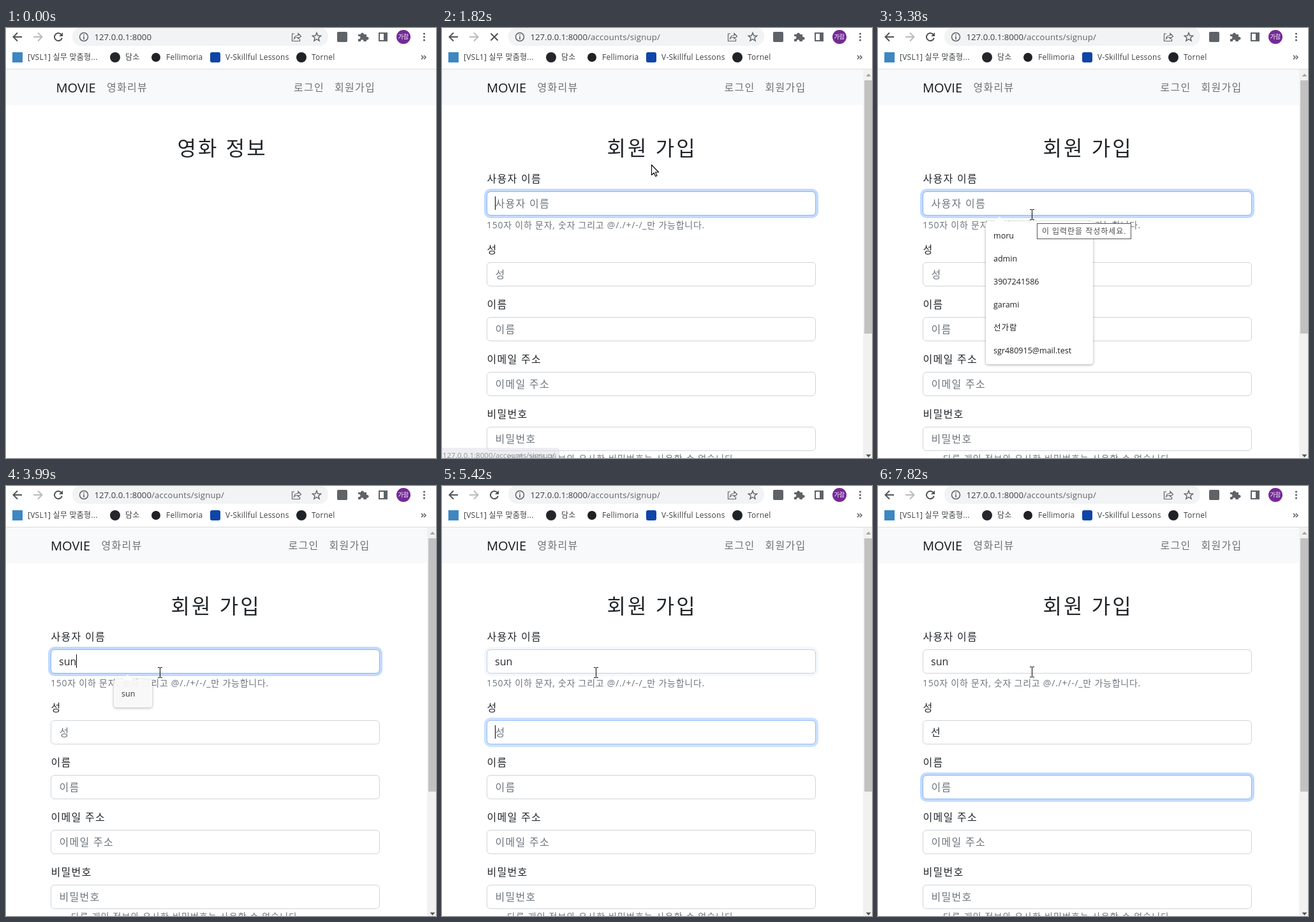
These frames come from a looping animation (674x674 px, 8000 ms). An HTML page with a canvas:

```html
<!DOCTYPE html>
<html lang="ko">
<head>
<meta charset="utf-8">
<title>회원 가입</title>
<style>
html, body { margin: 0; width: 100%; height: 100%; overflow: hidden; background: #fff; }
canvas { display: block; width: 674px; height: 674px; }
</style>
</head>
<body>
<canvas id="stage" width="674" height="674"></canvas>
<script>
const c = document.getElementById('stage').getContext('2d');
const LOOP = 8000, PAGE_AT = 1650, URL_AT = 1410;
const FONT = '"Open Sans", "Noto Sans CJK KR", "Noto Sans CJK", sans-serif';
const INK = '#212529', MUTED = '#6c757d', ICON = '#5f6368';

const clamp = v => Math.max(0, Math.min(1, v));
const ramp = (t, from, to) => clamp((t - from) / (to - from));
const within = (t, from, to) => t >= from && t < to;
// Last value whose start time has passed
const pick = (t, steps) => steps.reduce((v, s) => t >= s[0] ? s[1] : v, '');

// Vertically centred text; hangul is lighter and gets a full em of pitch
function text(str, x, cy, size, color = INK, spacing, weight) {
  const hangul = /[가-힣]/.test(str);
  spacing ??= hangul ? 0.08 : 0;
  weight ??= hangul ? 350 : 400;
  c.font = `${weight} ${size}px ${FONT}`;
  c.letterSpacing = `${(spacing * size).toFixed(2)}px`;
  c.fillStyle = color;
  c.fillText(str, x, cy + size * 0.37);
  return c.measureText(str).width;
}
function rect(x, y, w, h, color) {
  c.fillStyle = color;
  c.fillRect(x, y, w, h);
}
function round(x, y, w, h, r, fill) {
  c.beginPath();
  c.roundRect(x, y, w, h, r);
  if (fill) { c.fillStyle = fill; c.fill(); }
}
function disc(x, y, r, color) {
  c.beginPath();
  c.arc(x, y, r, 0, Math.PI * 2);
  c.fillStyle = color;
  c.fill();
}
function line(d, color = ICON, width = 2) {
  c.strokeStyle = color;
  c.lineWidth = width;
  c.stroke(new Path2D(d));
}
function shape(d, fill) {
  c.fillStyle = fill;
  c.fill(new Path2D(d));
}
function faded(alpha, draw) {
  if (alpha <= 0) return;
  c.save();
  c.globalAlpha = alpha;
  draw();
  c.restore();
}

function toolbar(t) {
  rect(0, 0, 674, 64, '#fff');
  line('M25 14H12M18 7.5L11.5 14L18 20.5', '#505458');
  line('M43 14H56M50 7.5L56.5 14L50 20.5', '#b9bbbe');
  if (within(t, 1200, 2150)) {
    line('M76.5 8.5L87.5 19.5M87.5 8.5L76.5 19.5', '#505458');
  } else {
    line('M86.6 10.2A6 6 0 1 0 87.8 15.5', '#505458');
    shape('M89 7V13H83Z', '#505458');
  }

  round(104, -1, 401, 29, 14, '#f1f3f4');
  line('M128.5 14a6.5 6.5 0 1 1 -13 0a6.5 6.5 0 1 1 13 0', ICON, 1.5);
  rect(121.2, 13, 1.6, 5, ICON);
  rect(121.2, 10, 1.6, 1.7, ICON);
  const host = text('127.0.0.1:8000', 138.5, 14, 13.2, '#3c4043');
  if (t >= URL_AT) text('/accounts/signup/', 138.5 + host, 14, 13.2, ICON, 0.016);

  line('M452 9H448.5V20.5H460.5V17M451.5 17C452 13 454.5 11.5 458 11.5V8.5L462.5 13L458 17V14.5C455 14.5 453 15 451.5 17Z', ICON, 1.2);
  const star = [];
  for (let i = 0; i < 10; i++) {
    const a = -Math.PI / 2 + i * Math.PI / 5, r = i % 2 ? 3 : 7;
    star.push(`${487 + r * Math.cos(a)} ${14.5 + r * Math.sin(a)}`);
  }
  line(`M${star.join('L')}Z`, ICON, 1.4);

  round(519, 6, 16, 16, 2, ICON);
  shape('M552 10H556A2.5 2.5 0 1 1 561 10H565V14A2.5 2.5 0 1 1 565 18.5V21H560.5A2.3 2.3 0 1 0 556 21H552V17A2.3 2.3 0 1 0 552 13Z', ICON);
  line('M585 8H597V20H585Z', ICON, 2);
  rect(592, 7, 6, 14, ICON);
  disc(623, 14, 11, '#742a97');
  text('가람', 614.5, 14, 9, '#fff', 0, 400);
  for (const y of [9, 14, 19]) disc(655.5, y, 1.6, ICON);

  rect(10, 38, 16, 16, '#3d87c3');
  disc(171, 46, 8, '#24262a');
  disc(235, 46, 7, '#202124');
  round(320, 38, 16, 16, 3, '#0f45a8');
  disc(463, 46, 8, '#1f2328');
  const marks = [['[VSL1] 실무 맞춤형...', 34], ['담소', 187], ['Fellimoria', 251],
    ['V-Skillful Lessons', 344], ['Tornel', 479]];
  for (const [label, x] of marks) text(label, x, 45.5, 12, '#3c4043', 0.02, 400);
  line('M651 43L654 46L651 49M655 43L658 46L655 49', ICON, 1.6);
  rect(0, 64, 674, 1, '#dadce0');
}

function navbar(dx, hover) {
  rect(0, 65, 674, 56, '#f8f9fa');
  const link = 'rgba(0,0,0,.55)';
  text('MOVIE', 78.5 + dx, 94, 20, 'rgba(0,0,0,.9)');
  text('영화리뷰', 158 + dx, 93, 16, link);
  text('로그인', 451 + dx, 93, 16, link);
  text('회원가입', 515 + dx, 93, 16, hover ? 'rgba(0,0,0,.7)' : link);
}

const heading = (str, x) => text(str, x, 188, 32, INK, 0.095);

function field(y, label, hint, value, ring) {
  text(label, 70.5, y - 20, 16);
  faded(ring * 0.25, () => {
    c.beginPath();
    c.roundRect(66, y - 4, 524, 46, 10);
    c.roundRect(70, y, 516, 38, 6);
    c.fillStyle = '#0d6efd';
    c.fill('evenodd');
  });
  round(70.5, y + 0.5, 515, 37, 5.5, '#fff');
  c.lineWidth = 1;
  c.strokeStyle = '#ced4da';
  c.stroke();
  faded(ring, () => { c.strokeStyle = '#86b7fe'; c.stroke(); });
  if (value) return text(value, 83, y + 19, 16);
  text(hint, 83.5, y + 19, 16, MUTED);
  return 0;
}

const userSteps = [[3580, 's'], [3790, 'su'], [3990, 'sun'], [4750, 'su'], [5160, 'sun']];
const surnameSteps = [[6430, 'ㅅ'], [6560, '서'], [6690, '선']];
const caretOn = [[1820, 2360], [2880, 3380], [3580, 4550], [5090, 5820], [6360, 7820]];
// Start of focus for each field; the last one ends after the loop
const FOCUS = [PAGE_AT, 5290, 7250, 2 * LOOP];

function form(t) {
  heading('회원 가입', 258.5);
  const glow = i => ramp(t, FOCUS[i], FOCUS[i] + 160);
  const ring = i => glow(i) - glow(i + 1);
  const surname = pick(t, surnameSteps);
  const widths = [
    field(256, '사용자 이름', '사용자 이름', pick(t, userSteps), ring(0)),
    field(367, '성', '성', surname, ring(1)),
    field(453, '이름', '이름', '', ring(2))
  ];
  field(539, '이메일 주소', '이메일 주소', '', 0);
  field(625, '비밀번호', '비밀번호', '', 0);
  text('150자 이하 문자, 숫자 그리고 @/./+/-/_만 가능합니다.', 70, 309, 14, MUTED, 0.054, 400);
  text('다른 개인 정보와 유사한 비밀번호는 사용할 수 없습니다.', 102, 675, 14, MUTED);

  if (surname && t < 7150) rect(84, 394, 14, 1, INK);
  if (caretOn.some(([a, b]) => within(t, a, b))) {
    const i = t < FOCUS[1] ? 0 : t < FOCUS[2] ? 1 : 2;
    rect(83 + Math.round(widths[i]), [264, 375, 461][i], 1, 21, '#000');
  }

  rect(660, 65, 14, 609, '#f1f1f1');
  rect(662, 82, 12, 397, '#c1c1c1');
  shape('M664.5 76H672.5L668.5 71.5Z', '#a3a3a3');
  shape('M664.5 668.5H672.5L668.5 673Z', '#505050');
}

function popup(rows, width, alpha) {
  faded(alpha, () => {
    const h = rows.length * 36 + 8;
    c.save();
    c.shadowColor = 'rgba(0,0,0,.35)';
    c.shadowBlur = 4;
    c.shadowOffsetY = 1;
    round(169, 303, width, h, 4, '#fff');
    c.restore();
    shape('M182 304L190.5 295.5L199 304Z', '#fff');
    rows.forEach((row, i) => text(row, 181, 325 + 36 * i, 12.5, '#202124', undefined, 400));
  });
}

function suggestions(t) {
  const mail = 'sgr480915@mail.test';
  if (t < 3580) popup(['moru', 'admin', '3907241586', 'garami', '선가람', mail], 168, ramp(t, 2290, 2480));
  else if (t < 3790) popup(['sun', mail], 168, 1);
  else {
    const alpha = t < 4700 ? 1 - ramp(t, 3970, 4200) : ramp(t, 4720, 4820) - ramp(t, 5150, 5300);
    popup(['sun'], 60, alpha);
  }
  if (within(t, 3380, 3580)) {
    rect(249, 306, 148, 25, '#575757');
    rect(250, 307, 146, 23, '#fff');
    text('이 입력란을 작성하세요.', 257, 319, 12, '#4a4a4a', 0.08, 400);
  }
}

const path = [[70, 648, 632], [200, 637, 560], [350, 632, 455], [520, 612, 320], [680, 574, 160],
  [800, 556, 96], [870, 554, 88], [1380, 554, 88], [1410, 550, 96], [1550, 482, 150],
  [1680, 402, 191], [1750, 352, 208], [1820, 328, 214], [1990, 260, 248], [2150, 211, 262],
  [2450, 211, 262], [2700, 234, 284], [2900, 241, 292], [7150, 241, 292], [7151, 241, 291], [LOOP, 241, 291]];

function pointerAt(t) {
  const i = Math.max(1, path.findIndex(p => p[0] > t));
  const [a, b] = [path[i - 1], path[i]], k = ramp(t, a[0], b[0]);
  return [a[1] + (b[1] - a[1]) * k, a[2] + (b[2] - a[2]) * k];
}

function pointer(t, x, y, hover) {
  if (t < 70) return;
  if (within(t, 1000, 1180) || within(t, 2220, 2360)) {
    c.save();
    c.globalCompositeOperation = 'multiply';
    disc(x, y, 13, '#fbfb80');
    c.restore();
  }
  c.save();
  c.translate(Math.round(x), Math.round(y));
  c.lineJoin = 'round';
  const outlined = d => { shape(d, '#fff'); line(d, '#000', 1.1); };
  if (hover) {
    outlined('M-1.5 1Q0 -1.5 1.5 1V7.5Q3.5 6 5 8Q7 7 8.5 9Q11.5 8 11.5 11V16Q11 19 9.5 22H1.5Q0 19 -4.5 13.5Q-5.5 10.5 -3 11.5L-1.5 13Z');
    line('M1.5 7.5V12M5 8V12M8.5 9V12', '#000', 0.9);
  } else if (t >= PAGE_AT && y >= 256) {
    rect(0, -7, 1, 15, '#000');
    for (const ey of [-8, 8]) {
      rect(-3, ey, 3, 1, '#000');
      rect(1, ey, 3, 1, '#000');
    }
  } else {
    outlined('M.5 .5V16.5L4.2 13L6.7 18.5L9 17.5L6.6 12H11.5Z');
  }
  c.restore();
}

function statusBar(t) {
  faded(ramp(t, 900, 940) * (1 - ramp(t, 1760, 1900)), () => {
    round(-2, 658, 186, 20, [0, 4, 0, 0], '#dee1e6');
    text('127.0.0.1:8000/accounts/signup/', 1, 669.5, 11.6, '#4a4d51');
  });
}

function draw(t) {
  const [x, y] = pointerAt(t);
  const onForm = t >= PAGE_AT;
  const hover = !onForm && t >= 70 && x > 514 && x < 580 && y > 80 && y < 106;
  rect(0, 0, 674, 674, '#fff');
  toolbar(t);
  navbar(onForm ? -8.5 : 0, hover);
  if (onForm) {
    form(t);
    suggestions(t);
  } else {
    heading('영화 정보', 268.5);
  }
  statusBar(t);
  pointer(t, x, y, hover);
}

const start = performance.now();
function frame() {
  draw((performance.now() - start) % LOOP);
  requestAnimationFrame(frame);
}
frame();
</script>
</body>
</html>
```
